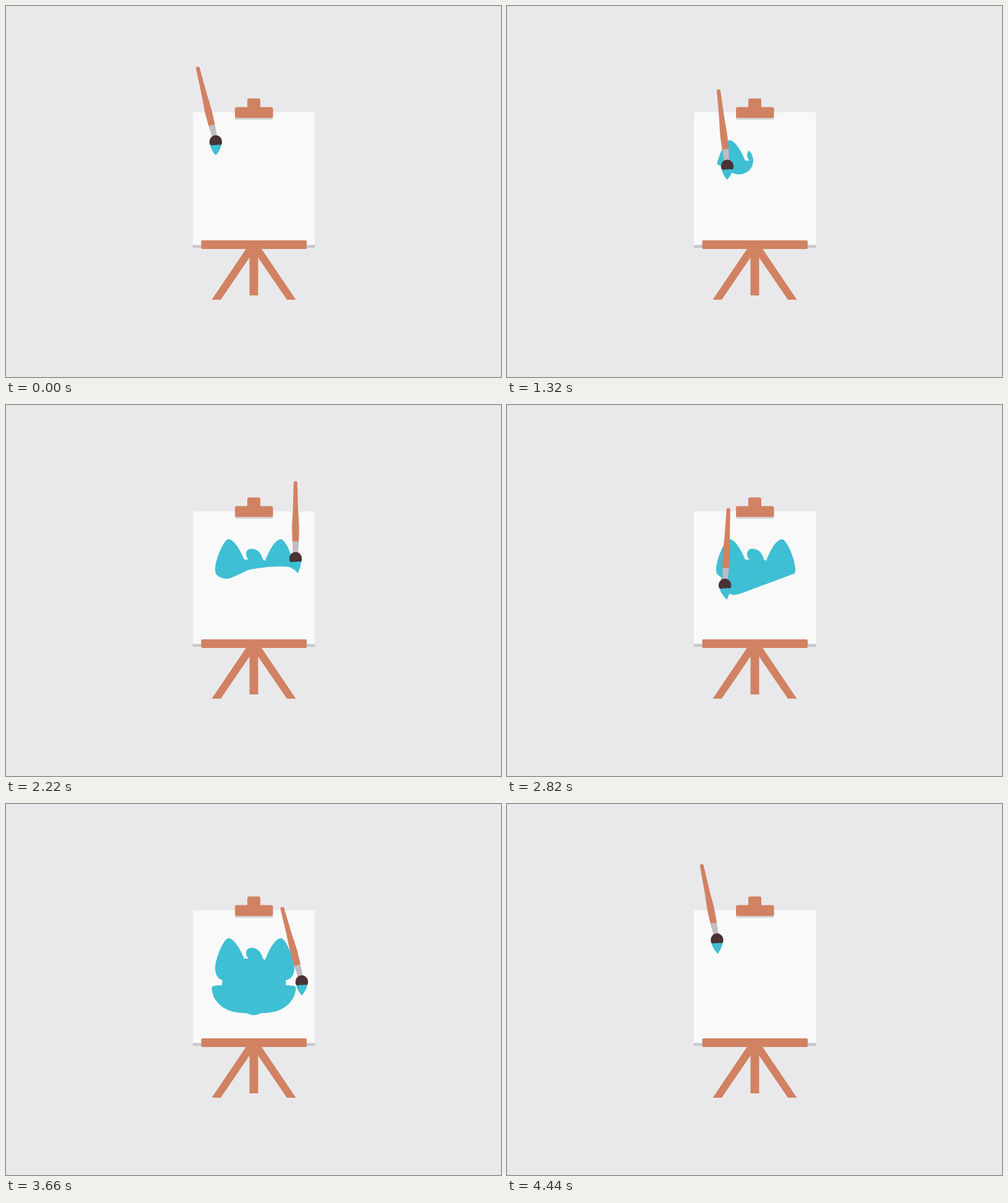
Recreate the animation shown at these times as an HTML page with a canvas. Size 800 by 600 pixels, loop 4470 ms.

```html
<!DOCTYPE html>
<html lang="en">
<head>
<meta charset="utf-8">
<title>Painting easel</title>
<style>
  html, body { margin: 0; width: 100%; height: 100%; overflow: hidden; background: #e9e9eb; }
  canvas { display: block; }
</style>
</head>
<body>
<canvas id="stage" width="800" height="600"></canvas>
<script>
const ctx = document.getElementById('stage').getContext('2d');
const LOOP = 4470, STEP = 30;
const WOOD = '#d18262', PAINT = '#3ebfd3', BRISTLE = '#4a3234', METAL = '#c1bcc3';
const PAPER = '#f9f9f9', SHADOW = '#c9c7cc', BACKDROP = '#e9e9eb';

// The brush sweeps from side to side between these turning points.
const turns = [
  { t: 0, x: 339, y: 219, lean: -29.5 },
  { t: 560, x: 375, y: 217, lean: 17 },
  { t: 1020, x: 353, y: 238, lean: -20 },
  { t: 1180, x: 376, y: 250, lean: 5 },
  { t: 1310, x: 356, y: 259, lean: -13 },
  { t: 2120, x: 473, y: 246, lean: -14 },
  { t: 2900, x: 349, y: 292, lean: -5 },
  { t: 3290, x: 459, y: 287, lean: -12 },
  { t: 3470, x: 372, y: 314, lean: 5 },
  { t: 3660, x: 478, y: 287, lean: -32 },
  { t: LOOP, x: 339, y: 219, lean: -29.5 }
];
const PAINT_LAG = 120, STROKE_WIDTH = 44;
const PAINT_DONE = 3640, FADE_START = 4200, FADE_END = 4410;

const cat = new Path2D(
  'M385 250C380 238 370 218 360 217C352 217 339 248 338 265C338 275 342 283 350 285' +
  'Q349 289 349 293L336 294Q332 295 332.5 299C335 324 358 338 384 338' +
  'C392 338 394 341.5 400.5 341.5C407 341.5 409 338 417 338C443 338 466 324 468.5 299' +
  'Q469 295 465 294L452 293Q453 289 452 285C462 283 466 275 466 265' +
  'C465 248 452 217 444 217C434 218 424 238 419 252L415 250Q414 245 412 242' +
  'C409 235 400 231 393 233C386 236 387 245 392 250Z');

const handle = new Path2D(
  'M-3 -122Q-3 -124.5 0 -124.5Q3 -124.5 3 -122L4 -85C4.5 -68 6 -56 5.7 -45L5.2 -27' +
  'L-5.2 -27L-5.7 -45C-6 -56 -4.5 -68 -4 -85Z');
const ferrule = new Path2D('M-5.2 -27.2L5.2 -27.2L4 -8L-4 -8Z');
const bristles = new Path2D(
  'M-9.5 5C-12 -3 -7 -10 0 -10C7 -10 12 -3 9.5 5Q6 6.5 4 5Q0 6.5 -3 5.5Q-6 7.5 -9.5 5Z');

const mix = (a, b, k) => a + (b - a) * k;

function brushAt(time) {
  const next = turns.findIndex(turn => turn.t > time);
  const a = turns[next - 1], b = turns[next];
  const u = (time - a.t) / (b.t - a.t);
  const eased = (1 - Math.cos(Math.PI * u)) / 2;
  const swell = Math.sin(Math.PI * u);
  const speed = (b.x - a.x) * Math.PI / 2 / (b.t - a.t) * swell;
  const sway = -Math.tanh(speed / 0.28);
  // Sweeps to the right rise in a slight arc.
  const lift = Math.max(0, b.x - a.x) * 0.1 * swell;
  return {
    x: mix(a.x, b.x, eased),
    y: mix(a.y, b.y, eased) - lift,
    lean: mix(a.lean, b.lean, eased) + 40 * sway,
    drag: 10 * sway
  };
}

function box(color, x, y, w, h, r = 0) {
  ctx.fillStyle = color;
  ctx.beginPath();
  ctx.roundRect(x, y, w, h, r);
  ctx.fill();
}

function shape(color, path) {
  ctx.fillStyle = color;
  ctx.fill(path);
}

function drawEasel() {
  box(BACKDROP, 0, 0, 800, 600);
  box(SHADOW, 302, 380, 197.5, 11);
  box(PAPER, 302, 172, 197.5, 214.5);
  shape(WOOD, new Path2D('M332.5 475H347L403 393L388.5 392Z'));
  shape(WOOD, new Path2D('M468.5 475H454L398 393L412.5 392Z'));
  box(WOOD, 393.5, 390, 14, 78);
  box(WOOD, 315.5, 379, 170.5, 14, 2);
}

function drawClip() {
  box('#d5d3d7', 370, 174, 61.5, 10, 2);
  box(WOOD, 370, 163.5, 61.5, 17.5, 3);
  box(WOOD, 390, 149.5, 21, 20, 3);
}

function drawPainting(t) {
  if (t >= FADE_END) return;
  ctx.save();
  if (t >= PAINT_DONE) {
    ctx.globalAlpha = Math.min(1, (FADE_END - t) / (FADE_END - FADE_START));
    shape(PAINT, cat);
  } else {
    // The wet trail follows the brush and only shows inside the cat.
    ctx.clip(cat);
    ctx.beginPath();
    for (let s = PAINT_LAG; s <= t - PAINT_LAG; s += STEP / 2) {
      const { x, y } = brushAt(s);
      ctx.lineTo(x, y);
    }
    ctx.strokeStyle = PAINT;
    ctx.lineWidth = STROKE_WIDTH;
    ctx.lineCap = ctx.lineJoin = 'round';
    ctx.stroke();
  }
  ctx.restore();
}

function drawBrush(t) {
  const { x, y, lean, drag } = brushAt(t);
  const tipY = 21 + 0.5 * Math.abs(drag);

  ctx.save();
  ctx.translate(x, y);
  ctx.save();
  ctx.rotate(Math.asin(lean / 124));
  shape(METAL, ferrule);
  shape(WOOD, handle);
  ctx.restore();

  ctx.beginPath();
  ctx.moveTo(-8.5, 3);
  ctx.quadraticCurveTo(-7 + drag * 0.2, 13, drag, tipY);
  ctx.quadraticCurveTo(7 + drag * 0.2, 13, 8.5, 3);
  ctx.closePath();
  ctx.fillStyle = ctx.strokeStyle = PAINT;
  ctx.lineWidth = 2;
  ctx.lineJoin = 'round';
  ctx.fill();
  ctx.stroke();
  shape(BRISTLE, bristles);
  ctx.restore();
}

const startTime = performance.now();

function frame() {
  const elapsed = Math.max(0, performance.now() - startTime);
  const t = Math.floor(elapsed / STEP + 0.01) * STEP % LOOP;
  drawEasel();
  drawClip();
  drawPainting(t);
  drawBrush(t);
  requestAnimationFrame(frame);
}
frame();
</script>
</body>
</html>
```
